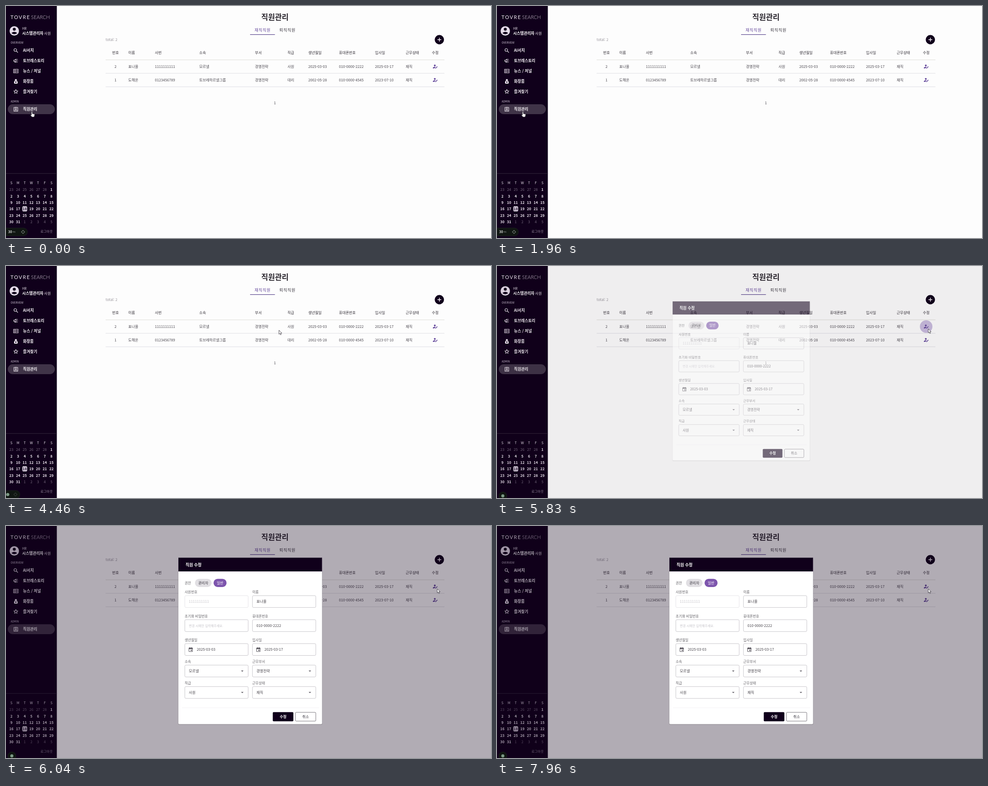
An HTML page for the animation above (8 s loop, 1083 px wide and 517 px high).

```html
<!DOCTYPE html>
<html lang="ko">
<head>
<meta charset="utf-8">
<title>직원관리</title>
<style>
html, body { margin: 0; width: 100%; height: 100%; overflow: hidden; background: #fdfdfd; }
svg { display: block; width: 100vw; height: 100vh; }
text { font-family: "Noto Sans CJK KR", "Noto Sans KR", "Noto Sans CJK JP", sans-serif; white-space: pre; }
.brand { font-family: Lato, sans-serif; }
</style>
</head>
<body>
<svg id="stage" viewBox="0 0 1083 517"></svg>
<script>
const NS = 'http://www.w3.org/2000/svg';
const DARK = '#10001b', PURPLE = '#65499c', INK = '#3a3740';
const stage = document.getElementById('stage');

function add(parent, tag, attrs, content) {
  const el = document.createElementNS(NS, tag);
  set(el, attrs);
  if (content != null) el.textContent = content;
  parent.append(el);
  return el;
}
function set(el, attrs) {
  for (const key in attrs) el.setAttribute(key, attrs[key]);
}
const group = (parent, attrs = {}) => add(parent, 'g', attrs);
const path = (parent, d, attrs) => add(parent, 'path', { d, ...attrs });
const rect = (parent, x, y, width, height, fill, attrs) =>
  add(parent, 'rect', { x, y, width, height, fill, ...attrs });
const circle = (parent, cx, cy, r, fill, attrs) =>
  add(parent, 'circle', { cx, cy, r, fill, ...attrs });
// y is the middle of the glyphs
const text = (parent, x, y, str, size, fill, attrs) =>
  add(parent, 'text', { x, y: y + size * .37, 'font-size': size, fill, ...attrs }, str);
const MID = { 'text-anchor': 'middle' }, MEDIUM = { 'font-weight': 500 }, BOLD = { 'font-weight': 700 };
// 24-unit icon, drawn at half size around its centre
const icon = (parent, cx, cy, attrs) =>
  group(parent, { transform: `translate(${cx - 6} ${cy - 6}) scale(.5)`, ...attrs });

const page = group(stage);
rect(page, 0, 0, 1083, 517, '#fdfdfd');

// Sidebar
rect(page, 0, 0, 113.5, 517, DARK);
text(page, 10, 25.3, 'TOVRE', 11.3, '#eee8f0', { class: 'brand', 'letter-spacing': 1.6 });
text(page, 56, 25.3, 'SEARCH', 11, '#d8d0dc', { class: 'brand', 'font-weight': 300 });
circle(page, 18.5, 55.5, 10.5, '#e6dcea');
circle(page, 18.5, 51.8, 3.3, DARK);
path(page, 'M12 60.3q6.5-5.6 13 0q-6.500 5.400-13 0z', { fill: DARK });
text(page, 36, 50.5, 'HR', 7.3, '#e6dfe9', MEDIUM);
text(page, 36, 61, '시스템관리자', 8.6, '#fff', BOLD);
text(page, 85, 61, '사원', 8.2, '#f0eaf2', MEDIUM);
text(page, 10.5, 82, 'OVERVIEW', 5.8, '#cfc6d4', MEDIUM);
text(page, 10.5, 213, 'ADMIN', 5.8, '#cfc6d4', MEDIUM);
rect(page, 4, 219, 105, 22, '#403448', { rx: 11 });

const LINE = { fill: 'none', stroke: '#f2ecf4', 'stroke-width': 2.2 };
const menu = [
  [99, 'AI서치', 'M15.500 10a6 6 0 1 1-12 0a6 6 0 1 1 12 0M14 14.500l7 7'],
  [122, '토브레스토리', 'M3 9h5l5-4v14l-5-4H3zM7 15v5M17 12h4M17 7l3-2M17 17l3 2'],
  [145, '뉴스 / 저널', 'M2 4h20v16H2zM5 8h8M5 12h8M5 16h8M17 8v8'],
  [168, '화장품', 'M9 3h6v3H9zM8 9h8l3 6v4q0 2-2 2H7q-2 0-2-2v-4z'],
  [190.5, '즐겨찾기', 'M12 3.500l2.600 5.600 6 .700-4.400 4.100 1.200 6L12 17l-5.400 2.900 1.200-6L3.400 9.800l6-.700z'],
  [230, '직원관리', 'M3.500 4h17v17h-17zM9 3h6M15 10.500a3 3 0 1 1-6 0a3 3 0 1 1 6 0M7 18q5-4 10 0']
];
for (const [y, label, d] of menu) {
  const g = icon(page, 22, y, LINE);
  path(g, d, label === '화장품' ? { fill: '#f2ecf4' } : {});
  if (label === '화장품') circle(g, 12, 15, 2, DARK, { stroke: DARK });
  text(page, 38, y, label, 8.6, '#f7f3f8', BOLD);
}

// Calendar
rect(page, 0, 372.700, 113.5, 1, '#352a3c');
rect(page, 36.5, 446.3, 10.7, 11.4, '#d8cfdd', { rx: 2.5 });
const dayX = i => 12 + i * 14.9;
[...'SMTWTFS'].forEach((c, i) => text(page, dayX(i), 394.5, c, 7.6, '#e6dfe9', { ...MID, ...MEDIUM }));
for (let i = 0; i < 42; i++) {
  const n = i - 5, inMonth = n > 0 && n < 32;
  const day = n < 1 ? n + 28 : n > 31 ? n - 31 : n;
  const fill = n === 18 ? '#2a1836' : inMonth ? '#efe8f1' : '#75687c';
  text(page, dayX(i % 7), 409.3 + Math.floor(i / 7) * 14.35, day, 8, fill,
    { ...MID, 'font-weight': inMonth ? 700 : 500 });
}
text(page, 77, 502.5, '로그아웃', 7.4, '#93879a');

// Heading and tabs
text(page, 600.5, 24.5, '직원관리', 16.6, '#29252d', { ...MID, ...BOLD });
text(page, 555, 53.5, '재직직원', 9, PURPLE, { ...MEDIUM, 'letter-spacing': .75 });
text(page, 610.5, 53.5, '퇴직직원', 9, INK, { ...MEDIUM, 'letter-spacing': .75 });
rect(page, 545, 63, 55.5, 1.200, '#55408a');
text(page, 222.5, 75, 'total: 2', 8, '#98959c');
circle(page, 967.7, 75, 10.4, DARK);
path(page, 'M963.500 75h8.400M967.700 70.800v8.400', { stroke: '#fff', 'stroke-width': 1.4 });

// Table
const cols = [244.5, 273, 332.5, 431.5, 556, 628.5, 675, 743.5, 824, 892.5, 958.5];
const rows = [
  [104, '번호', '이름', '사번', '소속', '부서', '직급', '생년월일', '휴대폰번호', '입사일', '근무상태', '수정'],
  [135, '2', '표나율', '1111111111', '모르넬', '경영전략', '사원', '2025-03-03', '010-0000-2222', '2025-03-17', '재직'],
  [165, '1', '도해온', '0123456789', '토브레하르넬그룹', '경영전략', '대리', '2002-05-28', '010-0000-4545', '2023-07-10', '재직']
];
const ripple = circle(page, 958.3, 135, 14, '#8365b5', { opacity: 0 });
rows.forEach(([y, ...cells], r) => {
  cells.forEach((cell, i) => text(page, cols[i], y, cell, 8.1, r ? '#4a474f' : '#302c34',
    { ...(i % 10 ? {} : MID), ...(r ? {} : MEDIUM) }));
  rect(page, 222.5, 119.5 + r * 30, 756.5, 1, r ? '#dedde4' : '#dcdcd6');
  if (!r) return;
  const g = icon(page, 958.5, y, { fill: PURPLE });
  circle(g, 10, 7, 4, PURPLE);
  path(g, 'M1 20q0-7 9-7l4 .600-6 6.400z');
  path(g, 'M12.500 20.500l9-9', { stroke: PURPLE, 'stroke-width': 3.2 });
});
text(page, 600.5, 216, '1', 8, '#4a4750', { ...MID, ...MEDIUM });

// Edit dialog
const scrim = rect(stage, 0, 0, 1083, 517, DARK);
const dialog = group(stage);
rect(dialog, 384.5, 72, 322, 371, '#000', { rx: 2, opacity: .12 });
rect(dialog, 385, 70.5, 320.7, 371, '#fff', { rx: 2 });
rect(dialog, 385, 70.5, 320.7, 30.700, DARK);
text(dialog, 401, 86.3, '직원 수정', 9, '#fff', BOLD);
text(dialog, 399, 127, '권한', 7.7, '#626066');
rect(dialog, 422, 117.7, 37, 18.3, '#e1dfe3', { rx: 9.1 });
text(dialog, 440.5, 126.8, '관리자', 8, INK, MID);
rect(dialog, 463.5, 117.7, 29, 18.3, '#7d55ad', { rx: 9.1 });
text(dialog, 478, 126.8, '일반', 8, '#fff', MID);

// kind: '' plain, 'off' faint, 'date' calendar icon, 'list' drop-down arrow
function field(x, y, label, value, kind) {
  const off = kind === 'off', date = kind === 'date';
  text(dialog, x, y - 21.300, label, 7.7, '#626066');
  rect(dialog, x + .3, y - 13.2, 141.5, 26.4, '#fff',
    { rx: 2.5, stroke: off && y < 200 ? '#dfdde2' : '#b9b7bd', 'stroke-width': .8 });
  text(dialog, x + (date ? 27 : 9.3), y, value, off && y > 200 ? 7 : 8.1, off ? '#c6c4ca' : '#46434a');
  if (date) {
    const g = icon(dialog, x + 13.5, y, { fill: '#55525a' });
    path(g, 'M4 5h16v16H4z', { fill: 'none', stroke: '#55525a', 'stroke-width': 2 });
    path(g, 'M4 5h16v5H4zM7 2h2v3H7zM15 2h2v3h-2zM12 13h5v5h-5z');
  }
  if (kind === 'list') path(dialog, `M${x + 125.8} ${y - 1.2}h5.600l-2.800 2.800z`, { fill: '#605d65' });
}
const L = 399, R = 550;
field(L, 168.4, '사원번호', '1111111111', 'off');
field(R, 168.4, '이름', '표나율', '');
field(L, 222, '초기화 비밀번호', '변경 시에만 입력해주세요.', 'off');
field(R, 222, '휴대폰번호', '010-0000-2222', '');
field(L, 275.3, '생년월일', '2025-03-03', 'date');
field(R, 275.3, '입사일', '2025-03-17', 'date');
field(L, 323.2, '소속', '모르넬', 'list');
field(R, 323.2, '근무부서', '경영전략', 'list');
field(L, 371, '직급', '사원', 'list');
field(R, 371, '근무상태', '재직', 'list');
rect(dialog, 393, 404.5, 306, 1, '#f3f2f5');
rect(dialog, 595.7, 414.8, 46, 20.4, DARK, { rx: 2 });
text(dialog, 618.7, 425, '수정', 8.2, '#fff', { ...MID, ...BOLD });
rect(dialog, 646.3, 415.2, 45.500, 19.6, '#fff', { rx: 2, stroke: '#55515a', 'stroke-width': .8 });
text(dialog, 669, 425, '취소', 8.2, INK, { ...MID, ...MEDIUM });

// Corner badge, shrinking to a dot
const badge = group(stage);
const pill = rect(badge, 0, 0, 0, 0, '#101612', { stroke: '#222a25', 'stroke-width': .6 });
const details = group(badge);
text(details, 5, 0, '30', 7, '#e6e8e6', BOLD);
text(details, 14.7, 0, 'ms', 4.4, '#a5aaa7');
const aim = group(badge, { fill: 'none', stroke: '#8a938d', 'stroke-width': .8 });
circle(aim, 0, 0, 3, 'none');
path(aim, 'M0-4.500v2.500M0 2v2.500M-4.500 0h2.500M2 0h2.500');
const dot = circle(badge, 0, 0, 3.5, '#7c9a86');

// Pointers, hot spot at the origin
const OUTLINE = { fill: '#fff', stroke: '#2b2730', 'stroke-width': .8, 'stroke-linejoin': 'round' };
const arrow = path(stage, 'M0 0v9l2.100-1.800 1.400 3.200 1.500-.700-1.400-3.100h2.800z', OUTLINE);
const hand = path(stage, 'M-1.200 1q1.200-1.600 2.200 0v4l4.200.800q1 .300.900 1.400l-.700 3.300-.800 1.800H-.100l-3.300-4.200q.400-1.400 2.200 0z', OUTLINE);

const clamp = v => Math.max(0, Math.min(1, v));
const span = (t, from, to) => clamp((t - from) / (to - from));
const smooth = p => p * p * (3 - 2 * p);
const mix = (a, b, p) => a + (b - a) * p;

const stops = [[4080, 58, 235], [4460, 608, 143], [4900, 950, 139], [5250, 963, 140]];
function pointer(t) {
  let [, x, y] = stops[0];
  for (let i = 1; i < stops.length; i++) {
    let p = span(t, stops[i - 1][0], stops[i][0]);
    p = i === 1 ? p * p : 1 - (1 - p) ** 2;
    if (t > stops[i - 1][0]) {
      x = mix(stops[i - 1][1], stops[i][1], p);
      y = mix(stops[i - 1][2], stops[i][2], p);
    }
  }
  return [x, y];
}

function draw(t) {
  const [x, y] = pointer(t), onMenu = x < 109;
  set(arrow, { transform: `translate(${x} ${y})`, visibility: onMenu ? 'hidden' : 'visible' });
  set(hand, { transform: `translate(${x} ${y})`, visibility: onMenu ? 'visible' : 'hidden' });

  const hover = span(t, 4850, 5000) * .08, press = span(t, 5640, 5800) * .35;
  set(ripple, { opacity: (hover + press) * (1 - span(t, 5830, 6000)) });

  const open = span(t, 5790, 6015), ease = 1 - (1 - open) ** 4, scale = mix(.9, 1, ease);
  set(scrim, { opacity: open * .32 });
  set(dialog, {
    opacity: ease,
    visibility: open ? 'visible' : 'hidden',
    transform: `translate(545.4 256) scale(${scale}) translate(-545.4 -256)`
  });

  const k = smooth(span(t, 4160, 4660));
  const left = mix(-20, 4, k), right = mix(48, 22, k), cy = mix(503.5, 512.2, k);
  set(pill, { x: left, y: cy - 8.8, width: right - left, height: 17.6, rx: 8.8 });
  set(details, { transform: `translate(${-12 * k} ${cy})`, opacity: clamp(1 - 2 * k) });
  set(aim, { transform: `translate(${right - 10} ${cy})`, opacity: 1 - k });
  set(dot, { cx: mix(-13, 13, k), cy });
}

const start = performance.now();
function tick() {
  draw((performance.now() - start) % 8000);
  requestAnimationFrame(tick);
}
tick();
</script>
</body>
</html>
```
